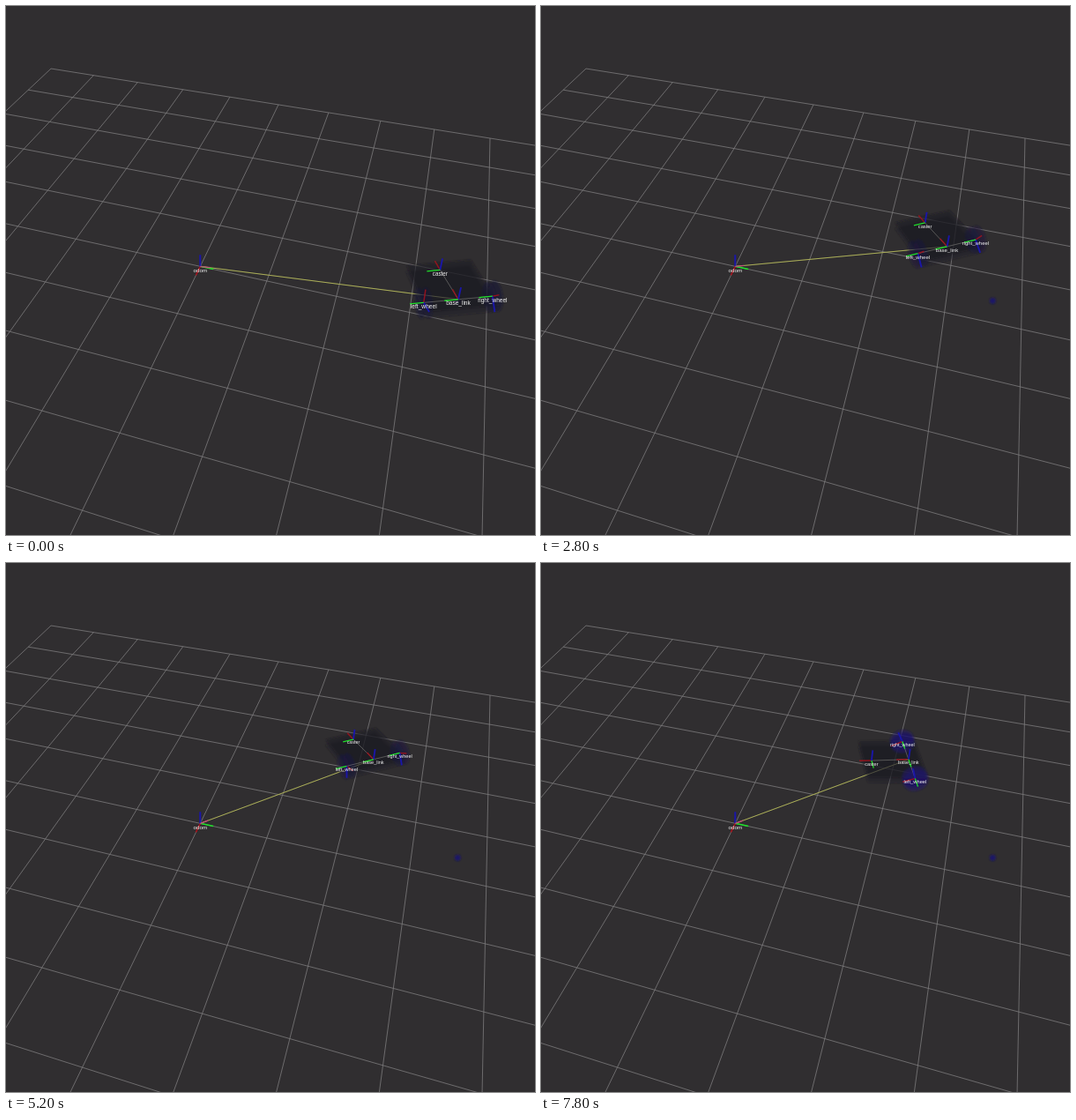
Recreate the animation shown at these times as an HTML page. Size 600x600 px, loop 8000 ms.

```html
<!DOCTYPE html>
<html>
<head>
<meta charset="utf-8">
<style>
html, body { margin: 0; width: 100%; height: 100%; overflow: hidden; background: #302e30; }
svg { display: block; width: 100%; height: 100%; }
text { font-family: "Liberation Sans", Arial, sans-serif; fill: #f2f2f2; text-anchor: middle; }
</style>
</head>
<body>
<svg viewBox="0 0 600 600">
  <defs>
    <filter id="soft" x="-30%" y="-30%" width="160%" height="160%"><feGaussianBlur stdDeviation="1"/></filter>
  </defs>
  <rect width="600" height="600" fill="#302e30"/>
  <g id="grid" stroke="#7d7c7d" stroke-width=".8"></g>
  <circle cx="512.3" cy="334.3" r="3.4" fill="#1b1568" filter="url(#soft)"/>
  <g id="scene"></g>
</svg>
<script>
const LOOP = 8000, STEP = 200;
const SPEED = 0.5, TURN = 27;            // m/s, deg/s
const DRIVE_FROM = 0.43, DRIVE_TO = 5.12; // s
const TRACK = 0.5, RADIUS = 0.2, AXIS = 0.2;
const RAD = Math.PI / 180;
const BLUE = '#1a16a8', RED = '#a3121c', GREEN = '#1fe02a';

const depth = (x, y) => 1 - 0.01556 * x - 0.04814 * y;

// Perspective view of a point on the 10 x 10 floor, z is height
function project([x, y, z = 0]) {
  const d = depth(x, y);
  const sx = (46.79 * x - 26.96 * y + 51) / d;
  const sy = (6.444 * x + 19.61 * y + 71) / d;
  const up = 44.3 * z / d;
  return [sx + up * (sx - 230) * 0.0008, sy - up];
}

const fmt = p => project(p).map(v => v.toFixed(2)).join(',');

function line(a, b, color, width, opacity = 1) {
  return `<path d="M${fmt(a)}L${fmt(b)}" fill="none" stroke="${color}" stroke-width="${width}" opacity="${opacity}"/>`;
}

function poly(points, color, opacity) {
  return `<polygon points="${points.map(fmt).join(' ')}" fill="${color}" fill-opacity="${opacity}"/>`;
}

function label(p, name) {
  const [x, y] = project(p);
  const size = 4.25 / depth(p[0], p[1]);
  return `<text x="${x.toFixed(2)}" y="${(y + size).toFixed(2)}" font-size="${size.toFixed(2)}">${name}</text>`;
}

let grid = '';
for (let i = 0; i <= 10; i++) {
  grid += line([i, 0], [i, 10], '#7d7c7d', 0.8) + line([0, i], [10, i], '#7d7c7d', 0.8);
}
document.getElementById('grid').innerHTML = grid;

const clamp = (v, lo, hi) => Math.min(hi, Math.max(lo, v));

// Turn, drive straight, turn again
function pose(t) {
  const driven = SPEED * (clamp(t, DRIVE_FROM, DRIVE_TO) - DRIVE_FROM);
  const spin = TURN * (Math.min(t, DRIVE_FROM) + Math.max(0, t - DRIVE_TO));
  const heading = (25.2 + spin) * RAD;
  const course = 36.8 * RAD;
  const roll = driven / RADIUS;
  const scrub = spin * RAD * TRACK / RADIUS;
  return {
    x: 8.622 - driven * Math.sin(course) * 1.005,
    y: 4.535 - driven * Math.cos(course) * 1.005,
    heading,
    left: -85 * RAD + roll - scrub,
    right: -135 * RAD + roll + scrub
  };
}

function draw(t) {
  const { x, y, heading, left, right } = pose(t);
  const s = Math.sin(heading), c = Math.cos(heading);
  // Robot frame: forward, left, up
  const at = (f, l, z = 0) => [x - f * s - l * c, y - f * c + l * s, z];

  function axes(f, l, roll = 0) {
    const o = at(f, l), ca = AXIS * Math.cos(roll), sa = AXIS * Math.sin(roll);
    return line(o, at(f + ca, l, -sa), RED, 1.5, 0.85) +
      line(o, at(f + sa, l, ca), BLUE, 1.9) +
      line(o, at(f, l + AXIS), GREEN, 1.3);
  }

  function wheel(l) {
    const k = clamp((heading / RAD - 25) / 75, 0, 1);
    const color = `hsl(246,${40 + 28 * k}%,${15 + 10 * k}%)`;
    let out = '';
    for (const side of [-0.05, 0.05]) {
      const rim = [];
      for (let a = 0; a < 360; a += 20) {
        rim.push(at(RADIUS * Math.cos(a * RAD), l + side, RADIUS * Math.sin(a * RAD)));
      }
      out += poly(rim, color, 0.55);
    }
    return out;
  }

  const slab = z => [at(0.74, 0.48, z), at(0.74, -0.5, z), at(-0.2, -0.5, z), at(-0.2, 0.52, z)];
  const odom = [5, 5], base = at(0, 0), caster = at(0.61, 0.02);
  const lw = at(0, TRACK), rw = at(0, -TRACK);
  const toward = [5 + (x - 5) * 0.04, 5 + (y - 5) * 0.04];

  document.getElementById('scene').innerHTML =
    line(odom, base, '#a9ad48', 1) +
    `<g filter="url(#soft)">${poly(slab(-0.08), '#1d1b23', 0.4)}${poly(slab(0.02), '#1b1922', 0.65)}${wheel(-TRACK)}${wheel(TRACK)}</g>` +
    line(odom, base, '#a9a99c', 0.7, 0.3) +
    [lw, rw, caster].map(p => line(p, base, '#a8a8a0', 0.7, 0.6)).join('') +
    line(odom, [5.2, 5], GREEN, 1.5) +
    line(odom, [5, 5.2], RED, 1.6) +
    line(odom, [5, 5, 0.2], BLUE, 2) +
    line(odom, toward, '#c0507a', 1.3) +
    axes(0.61, 0.02) + axes(0, 0) + axes(0, TRACK, left) + axes(0, -TRACK, right) +
    label(odom, 'odom') + label(caster, 'caster') + label(base, 'base_link') +
    label(lw, 'left_wheel') + label(rw, 'right_wheel');
}

let shown = -1;
const start = performance.now();
function tick() {
  const step = Math.floor((performance.now() - start) % LOOP / STEP);
  if (step !== shown) {
    shown = step;
    draw(step * STEP / 1000);
  }
  requestAnimationFrame(tick);
}
tick();
</script>
</body>
</html>
```
